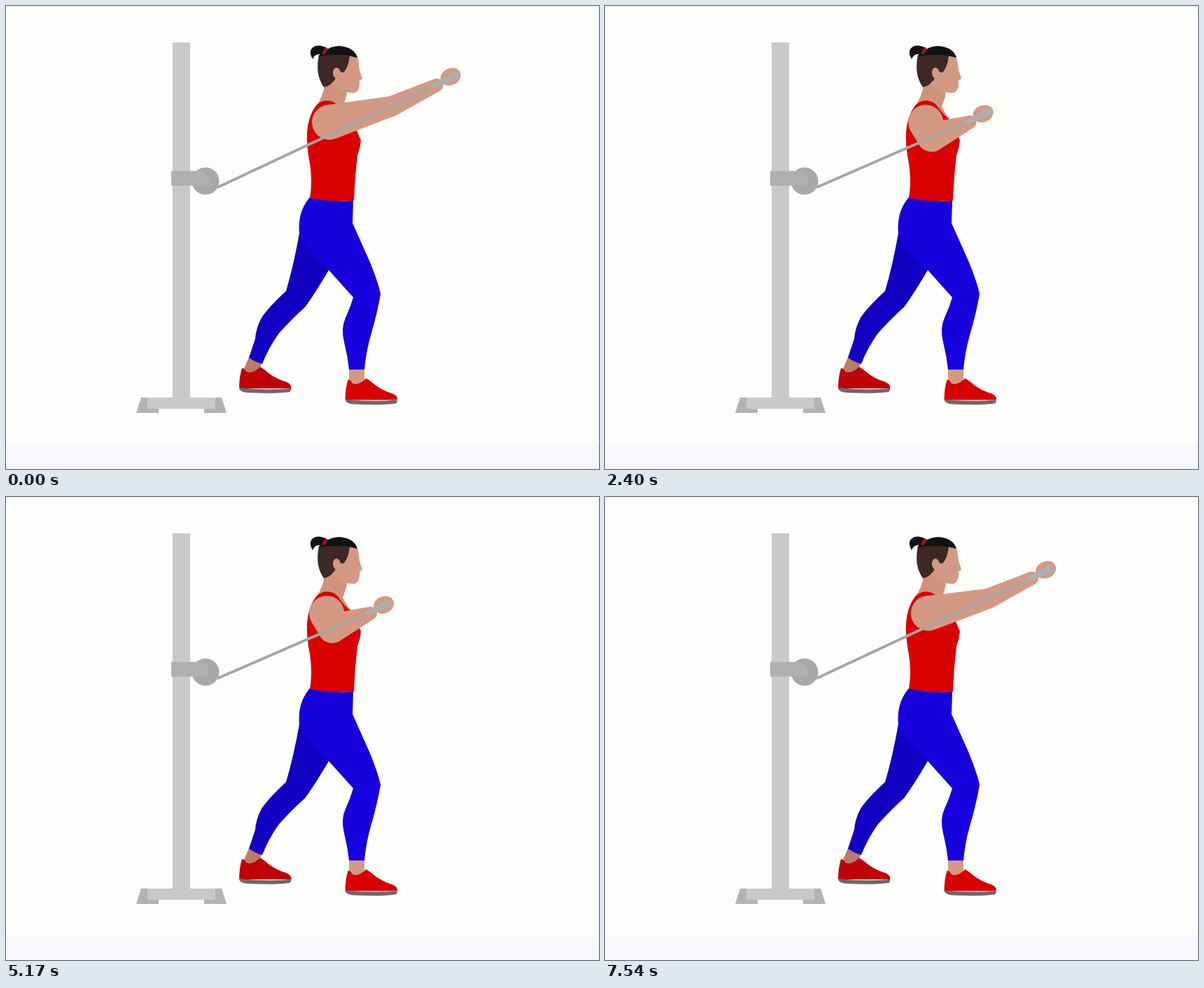
Recreate the animation shown at these times as an HTML page with a canvas. Size 847x661 px, loop 7570 ms.

```html
<!DOCTYPE html>
<html lang="en">
<head>
<meta charset="utf-8">
<title>Cable press</title>
<style>
html, body { margin: 0; width: 847px; height: 661px; overflow: hidden; background: #fdfdfc; }
canvas { display: block; }
</style>
</head>
<body>
<canvas id="stage" width="847" height="661"></canvas>
<script>
const ctx = document.getElementById('stage').getContext('2d');
const LOOP = 7570, REP = 3640;
const SKIN = '#d49983', RED = '#d90202', CABLE = '#a6a6a6';

const FRONT_LEG = new Path2D(`M434 273 Q465 280 496 278 L495 310 L520 366 Q532 396 535 411
  Q530 440 521 470 Q514 495 512 519 H490 Q488 500 483 480 Q478 460 485 445 Q492 430 496 416
  L461 377 Q432 352 419 325 C417 300 424 285 434 273Z`);
const BACK_LEG = new Path2D(`M419 324 L461 377 Q441 411 427 430 Q410 445 390 467
  Q375 488 366 511 Q355 508 347 502 L356 475 Q357 460 365 445 Q375 430 400 407 Q411 370 419 324Z`);
const SHIRT = new Path2D(`M434 274 Q438 250 434 225 Q429 200 430 180 Q432 156 443 142 Q450 135 458 135
  Q468 135 474 142 Q483 156 495 164 Q502 180 507 192 Q506 203 502 213 Q498 245 497 278 Q465 280 434 274Z`);
const NECK = new Path2D('M455 112 Q453 130 442 144 L470 160 L495 164 Q485 154 481 143 Q486 132 487 122 L482 100Z');
const FACE = new Path2D(`M489 70 L502 73 Q504 80 505 92 L509 103 Q508 106 505 106
  Q506 124 495 124 L486 123 Q474 120 466 110 L474 92Z`);
const HAIR = new Path2D(`M447 70 Q441 98 454 116 Q463 114 466 109 Q472 105 471 98
  Q472 93 476 94 L482 95 Q489 88 491 71 L470 66Z`);
const CAP = new Path2D('M446 72 Q458 58 476 57 Q498 59 502 74 L490 71 Q470 68 446 72Z');
const BUN = new Path2D('M438 76 Q430 62 442 57 Q449 55 459 60 L453 70 Q442 66 438 76Z');
const SHOE = new Path2D(`M337 517 Q333 530 333 546 H407 Q409 541 401 537 Q385 532 375 524
  Q368 518 363 515 Q352 526 343 522 Q341 517 337 517Z`);
const SOLE = new Path2D('M333 545 Q333 551 345 552 Q385 554 405 551 Q408 549 407 546 Q370 549 333 545Z');
const BASE_FOOT = new Path2D('M193 559 H202 V575 H218 V581 H186Z');

const lerp = (a, b, k) => a + (b - a) * k;
const ease = u => (1 - Math.cos(Math.PI * Math.min(1, Math.max(0, u)))) / 2;

function fill(path, color) {
  ctx.fillStyle = color;
  ctx.fill(path);
}

function rect(x, y, w, h, color, corners = 0) {
  const path = new Path2D();
  path.roundRect(x, y, w, h, corners);
  fill(path, color);
}

function oval(x, y, rx, ry, color, turn = 0) {
  const path = new Path2D();
  path.ellipse(x, y, rx, ry, turn, 0, 2 * Math.PI);
  fill(path, color);
}

// Two round joints joined by their outer tangents
function limb(a, b, color) {
  const dx = b.x - a.x, dy = b.y - a.y;
  const dir = Math.atan2(dy, dx), open = Math.acos((a.r - b.r) / Math.hypot(dx, dy));
  const path = new Path2D();
  path.arc(a.x, a.y, a.r, dir + open, dir - open + 2 * Math.PI);
  path.arc(b.x, b.y, b.r, dir - open, dir + open);
  fill(path, color);
}

// 0 = arm stretched, 1 = arm fully bent
const bendAt = ms => ease(ms / 1740) - ease((ms - 2230) / 1320);

function drawMachine() {
  rect(238, 52, 25, 508, '#c9c9c8');
  rect(201, 559, 100, 16, '#c9c9ca');
  fill(BASE_FOOT, '#b3b3b6');
  ctx.save();
  ctx.translate(501, 0);
  ctx.scale(-1, 1);
  fill(BASE_FOOT, '#b3b3b6');
  ctx.restore();
  oval(285, 250, 19.5, 19.5, '#a8a8a8');
  rect(236, 235.5, 54, 21, '#b0b0b0', [0, 14, 0, 0]);
}

function drawShoe(x, y, color) {
  ctx.save();
  ctx.translate(x, y);
  fill(SHOE, color);
  fill(SOLE, '#6c686c');
  ctx.restore();
}

function drawLegs() {
  limb({ x: 356, y: 506, r: 10 }, { x: 350, y: 520, r: 10 }, '#b97c6a');
  rect(490, 517, 22, 22, SKIN);
  fill(BACK_LEG, '#1200c2');
  fill(FRONT_LEG, '#1600dc');
  drawShoe(0, 0, '#be0408');
  drawShoe(151.5, 16.5, RED);
}

function drawBody() {
  fill(NECK, '#cf937d');
  fill(FACE, SKIN);
  fill(HAIR, '#3d2826');
  oval(472.5, 96, 5.5, 8, SKIN, -0.15);
  fill(BUN, '#111116');
  fill(CAP, '#111114');
  fill(new Path2D('M451 68 L456 59 L460 61 L455 69Z'), '#a81418');
  fill(SHIRT, RED);
}

function drawArm(k) {
  const shoulder = { x: lerp(462, 458, k), y: 166, r: 25 };
  const elbow = { x: lerp(551, 463, k), y: lerp(143, 189, k), r: 14.5 + 7 * k * k };
  const wrist = { x: lerp(615, 517, k), y: lerp(113, 168, k), r: 9.5 };
  const fist = { x: lerp(635, 536, k), y: lerp(101, 156, k) };
  const gripX = fist.x + 8, gripY = fist.y - 2;
  const pull = Math.atan2(gripY - 259, gripX - 302);

  limb(shoulder, elbow, SKIN);
  limb(elbow, wrist, SKIN);
  oval(fist.x, fist.y, 15, 12, SKIN, pull);

  ctx.strokeStyle = CABLE;
  ctx.lineWidth = 4;
  ctx.beginPath();
  ctx.moveTo(302, 259);
  ctx.lineTo(gripX - 4, gripY + 2);
  ctx.stroke();
  ctx.save();
  ctx.translate(gripX, gripY);
  ctx.rotate(pull);
  fill(new Path2D('M-38 -2.5 L-8 -5 Q0 -8 3 -4 Q5 0 2 5 L-8 5 L-38 2.5Z'), '#aeafad');
  ctx.restore();
}

function draw(ms) {
  rect(0, 0, 847, 661, '#f8f8fc');
  rect(0, -20, 847, 648, '#fdfdfc', 10);
  drawMachine();
  drawLegs();
  drawBody();
  drawArm(bendAt(ms % REP));
}

const start = performance.now();
function tick() {
  draw((performance.now() - start) % LOOP);
  requestAnimationFrame(tick);
}
tick();
</script>
</body>
</html>
```
